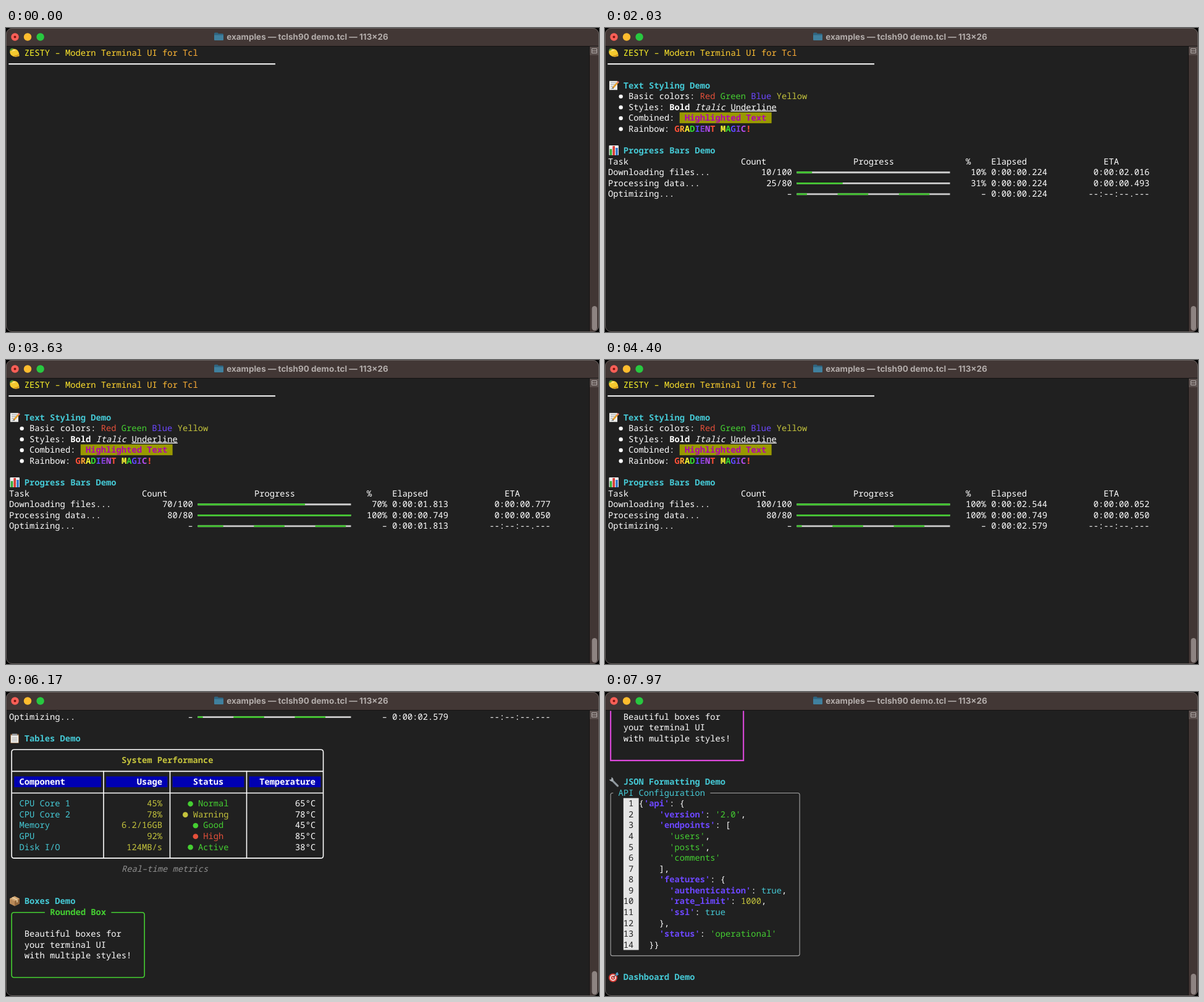
An HTML page that plays this animation: 960x492 px, repeating every 8000 ms.

```html
<!DOCTYPE html>
<html lang="en">
<head>
<meta charset="utf-8">
<title>Terminal demo</title>
<style>
html, body { margin: 0; width: 100%; height: 100%; overflow: hidden; background: #000; }
svg { display: block; width: 960px; height: 492px; }
text {
  font: 500 13.783px "Noto Sans Mono", "DejaVu Sans Mono", monospace;
  white-space: pre; text-rendering: geometricPrecision; font-variant-ligatures: none;
}
.b { font-weight: 700; }
.i { font-style: italic; }
.u { text-decoration: underline; }
.caption { font: 700 13.5px Inter, "Liberation Sans", sans-serif; text-anchor: middle; }
</style>
</head>
<body>
<svg viewBox="0 0 960 492">
  <defs>
    <clipPath id="win"><rect width="960" height="492" rx="10"/></clipPath>
    <clipPath id="view"><rect y="30.5" width="944" height="460"/></clipPath>
  </defs>
  <g clip-path="url(#win)">
    <rect width="960" height="492" fill="#202020"/>
    <rect width="960" height="29" fill="#423735"/>
    <rect x="944" y="29" width="16" height="463" fill="#413634"/>
    <path d="M0 29.5H960M944.5 29V492" stroke="#151313"/>
    <rect x="945" y="30" width="14" height="14" fill="#5a4f4d"/>
    <path d="M948.5 33.5h8v7h-8zM948.5 37h8" fill="none" stroke="#b3acaa"/>
    <rect id="thumb" x="948.5" width="8.5" rx="4.2" fill="#8d8381"/>
    <g clip-path="url(#view)"><g id="doc"></g></g>
  </g>
  <rect x=".5" y=".5" width="959" height="491" rx="9.5" fill="none" stroke="#67605e"/>
  <circle cx="14.5" cy="14.5" r="6.2" fill="#ff5f57"/>
  <circle cx="14.5" cy="14.5" r="2" fill="#7d1510"/>
  <circle cx="35" cy="14.5" r="6.2" fill="#febc2e"/>
  <circle cx="55.6" cy="14.5" r="6.2" fill="#28c840"/>
  <path d="M337 9q0-1.500 1.500-1.500h4l1.500 1.500h6.500q1.500 0 1.500 1.500v8q0 1.500-1.500 1.500h-12q-1.500 0-1.500-1.500z" fill="#2f6580"/>
  <path d="M337 11.500h15v7q0 1.500-1.500 1.500h-12q-1.500 0-1.500-1.500z" fill="#40809e"/>
  <text class="caption" x="488" y="19" fill="#b3adab">examples — tclsh90 demo.tcl — 113×26</text>
</svg>
<script>
const LOOP = 8000, CW = 8.27, LH = 17.56;
const WHITE = '#fff', RED = '#e5503a', GREEN = '#45cf32', BLUE = '#6c47ff',
      YELLOW = '#c4c33c', CYAN = '#45c8d4', GREY = '#8f8f8f', PINK = '#dd48dc';
const X = c => 5 + c * CW, Y = r => 40 + r * LH;

// ---- drawing helpers: rows and columns of the terminal grid ----
const span = (s, fill) => `<tspan fill="${fill}">${s}</tspan>`;
const put = (r, c, s, fill = WHITE, cls = '') =>
  `<text x="${X(c)}" y="${Y(r) + 4.9}" fill="${fill}" class="${cls}">${s}</text>`;
const right = (r, end, s, fill, cls) => put(r, end - s.length, s, fill, cls);
const dot = (r, c, fill, size) => `<circle cx="${X(c + .5)}" cy="${Y(r) + .6}" r="${size}" fill="${fill}"/>`;
const fillCells = (r, c1, c2, fill, rows = 1) =>
  `<rect x="${X(c1)}" y="${Y(r) - 8.8}" width="${(c2 - c1) * CW}" height="${rows * LH}" fill="${fill}"/>`;
const path = (d, color, w, extra = '') => `<path d="${d}" fill="none" stroke="${color}" stroke-width="${w}" ${extra}/>`;
const hLine = (r, x1, x2, color, w, extra) => path(`M${x1} ${Y(r) + .6}H${x2}`, color, w, extra);

// Frame from row r1 to r2, right edge at column c2, top edge open between two columns
function frame(r1, r2, c2, [g1, g2], color, w, rad, inset = 0) {
  const x0 = X(.5) + inset, x1 = X(c2 + .5) - inset, y0 = Y(r1) + .6 + inset, y1 = Y(r2) + .6 - inset;
  return path(`M${X(g1)} ${y0}H${x0 + rad}Q${x0} ${y0} ${x0} ${y0 + rad}V${y1 - rad}Q${x0} ${y1} ${x0 + rad} ${y1}` +
    `H${x1 - rad}Q${x1} ${y1} ${x1} ${y1 - rad}V${y0 + rad}Q${x1} ${y0} ${x1 - rad} ${y0}H${X(g2)}`, color, w);
}

const icons = {
  lemon: `<path d="M-7.500-3Q-5-7.500 1-6Q7-4 7.500 3.500Q8 6 6 6Q-1 8-5.500 4Q-8.500 1-7.500-3z" fill="#f4c92f"/>
    <path d="M-5-2Q-2-6 2-4Q-2-3-5-2z" fill="#fff0a0"/><path d="M-3 4Q2 7 6 5.500Q7 4 6.500 2Q3 5-3 4z" fill="#d99a1c"/>
    <path d="M-8-3Q-7-8-2-7Q-4-3-8-3z" fill="#5f9a35"/>`,
  memo: `<path d="M-7-7H6V7.500H-7z" fill="#eeeeec"/><path d="M-5-4H4M-5-1H4M-5 2H1M-5 5H0" stroke="#9aa0a6"/>
    <path d="M7-5L-1 4" stroke="#e8a02e" stroke-width="2.800"/><path d="M-2 5.500L-1.800 3L0 4.700z" fill="#333"/><path d="M6-4L8-6" stroke="#e77c7c" stroke-width="2.800"/>`,
  chart: `<rect x="-7.500" y="-8" width="15.500" height="16" rx="1" fill="#f1f1f1"/><path d="M-7-3H8M-7 2H8" stroke="#c5ccd2" stroke-width=".7"/>
    <path d="M-4.500 8V-2" stroke="#36ad3b" stroke-width="3.600"/><path d="M.2 8V-7" stroke="#d83a33" stroke-width="3.600"/><path d="M5 8V-4" stroke="#2f74c8" stroke-width="3.600"/>`,
  clipboard: `<rect x="-7" y="-7" width="14" height="15" rx="1.500" fill="#8c6846"/><rect x="-6" y="-5" width="12" height="12" fill="#ecebe7"/>
    <path d="M-4-1H4M-4 1.500H4M-4 4H4" stroke="#b0b0b0"/><path d="M-4-7.500H4V-4.500H-4z" fill="#9b9fa4"/>`,
  parcel: `<path d="M-8-4L0-8L8-4L8 4L0 8L-8 4z" fill="#b98a58"/><path d="M0 0L8-4V4L0 8z" fill="#94683d"/>
    <path d="M-8-4L0-8L8-4L0 0z" fill="#d1a572"/><path d="M-4-6L4-2V2" fill="none" stroke="#ecd2a6" stroke-width="1.600"/>`,
  wrench: `<path d="M-3-3L6.500 6.500" stroke="#8f979d" stroke-width="3.200" stroke-linecap="round"/>
    <path d="M-3.500-7.500Q1-5-1-1Q-4 1-7.500-3.500L-4.500-3.500L-3.500-5z" fill="#a4abb0"/>`,
  target: `<circle cx="-1" cy="1" r="7" fill="#d53c36"/><circle cx="-1" cy="1" r="5" fill="#f3eeee"/><circle cx="-1" cy="1" r="3.300" fill="#d53c36"/>
    <circle cx="-1" cy="1" r="1.300" fill="#fff"/><path d="M-1 1L5-5" stroke="#444" stroke-width="1.200"/><path d="M3-3L4-7L7-8L7-5.500L8.500-5L6-2.500z" fill="#4a9ac4"/>`
};
const icon = (r, name) => `<g transform="translate(14 ${Y(r)})">${icons[name]}</g>`;
const heading = (r, name, s) => icon(r, name) + put(r, 3, s, CYAN, 'b');
const bullet = (r, s) => dot(r, 2, WHITE, 3.2) + put(r, 4, s);

// ---- terminal content ----
function banner() {
  const s = 'ZESTY – Modern Terminal UI for Tcl';
  const letters = [...s].map((ch, i) => {
    const f = i / (s.length - 1);
    return span(ch, `rgb(255,${Math.round(252 - 80 * f)},${Math.round(40 + 15 * f)})`);
  });
  return icon(0, 'lemon') + put(0, 3, letters.join('')) + hLine(1, 4.3, 436, WHITE, 2);
}

function rainbow() {
  const hues = ['#ff5038', '#ffa32e', '#ffff33', '#35d92e', '#5b48ff', '#8040d8', '#b64df2'];
  return bullet(7, 'Rainbow:') +
    put(7, 13, [...'GRADIENT MAGIC!'].map((ch, i) => span(ch, hues[i % 7])).join(''), WHITE, 'b');
}

function table() {
  const cols = [0, 18, 31, 46, 61];
  const rows = [
    ['CPU Core 1', '45%', 'Normal', 35, GREEN, '65°C'],
    ['CPU Core 2', '78%', 'Warning', 34, YELLOW, '78°C'],
    ['Memory', '6.2/16GB', 'Good', 36, GREEN, '45°C'],
    ['GPU', '92%', 'High', 36, RED, '85°C'],
    ['Disk I/O', '124MB/s', 'Active', 35, GREEN, '38°C']
  ];
  let out = frame(16, 26, 61, [1, 1], WHITE, 1.6, 4) + put(17, 22, 'System Performance', YELLOW, 'b');
  for (const r of [18, 20]) out += hLine(r, X(.5), X(61.5), WHITE, 1.6);
  for (const c of cols.slice(1, 4)) out += path(`M${X(c + .5)} ${Y(18)}V${Y(26) + 1}`, WHITE, 1.6);
  for (let i = 0; i < 4; i++) out += fillCells(19, cols[i] + 1, cols[i + 1], '#0000b2');
  out += put(19, 2, 'Component', WHITE, 'b') + put(19, 25, 'Usage', WHITE, 'b') +
    put(19, 36, 'Status', WHITE, 'b') + put(19, 49, 'Temperature', WHITE, 'b');
  rows.forEach(([name, use, state, c, color, temp], i) => {
    const r = 21 + i;
    out += put(r, 2, name, CYAN) + right(r, 30, use, YELLOW) + dot(r, c, color, 4.3) +
      put(r, c + 2, state, color) + right(r, 60, temp);
  });
  return out + put(27, 22, 'Real–time metrics', GREY, 'i');
}

const boxText = r => ['Beautiful boxes for', 'your terminal UI', 'with multiple styles!']
  .map((s, i) => put(r + i, 3, s)).join('');

function json() {
  const lines = [
    [6, "{'api': {"], [10, "'version': '2.0',"], [10, "'endpoints': ["], [12, "'users',"], [12, "'posts',"],
    [12, "'comments'"], [10, '],'], [10, "'features': {"], [12, "'authentication': true,"],
    [12, "'rate_limit': 1000,"], [12, "'ssl': true"], [10, '},'], [10, "'status': 'operational'"], [8, '}}']
  ];
  const paint = s => s.replace(/('\w+')(?=:)|('[^']+')|(true)|(\d+)/g, (m, key, str, bool) =>
    key ? `<tspan class="b" fill="${BLUE}">${m}</tspan>` : span(m, str ? GREEN : bool ? CYAN : YELLOW));
  let out = heading(53, 'wrench', 'JSON Formatting Demo') + frame(54, 69, 37, [1, 20], '#a6a6a6', 1.1, 3) +
    put(54, 2, 'API Configuration', CYAN) + fillCells(55, 3, 6, '#e5e5e5', 14);
  lines.forEach(([c, s], i) => {
    out += right(55 + i, 5, String(i + 1), '#222') + put(55 + i, c, paint(s));
  });
  return out;
}

// ---- progress bars ----
const BAR_START = 1805;
const ticks = [[1, 14], [5, 224], [15, 749], [21, 1081], [49, 2544], [50, 2579]];
function stamp(k) {
  const j = ticks.findIndex(p => p[0] >= k);
  if (j === 0) return ticks[0][1];
  const [a, ta] = ticks[j - 1], [b, tb] = ticks[j];
  return Math.round(ta + (tb - ta) * (k - a) / (b - a));
}
function tickAt(t) {
  let k = 0;
  while (k < 50 && BAR_START + stamp(k + 1) <= t) k++;
  return k;
}
const clock = ms => '0:00:0' + (ms / 1000).toFixed(3);
const track = (r, color, cells, extra) => hLine(r, X(37) - .6, X(37 + cells) - .6, color, 2.8, extra);

function task(r, name, k, step, total) {
  const last = Math.min(k, total / step - 1), seen = last * step, n = Math.min(k * step, total);
  return put(r, 0, name) + right(r, 36, n + '/' + total) + track(r, '#cdcdcd', 30) +
    track(r, '#3fc42d', Math.floor(30 * n / total)) + right(r, 74, Math.floor(100 * n / total) + '%') +
    put(r, 75, clock(stamp(last))) + right(r, 106, clock(stamp(last) * (total - seen) / seen));
}
function bars(k) {
  if (!k) return '';
  const phase = 8 + Math.round(1.311 * (k - 5)), run = 6 * CW;
  const heads = [[0, 'Task'], [26, 'Count'], [48, 'Progress'], [70, '%'], [75, 'Elapsed'], [97, 'ETA']];
  return heads.map(([c, s]) => put(10, c, s)).join('') +
    task(11, 'Downloading files...', k, 2, 100) + task(12, 'Processing data...', k, 5, 80) +
    put(13, 0, 'Optimizing...') + right(13, 36, '–') + track(13, '#cdcdcd', 30) +
    track(13, '#3fc42d', 30, `stroke-dasharray="${run} ${run}" stroke-dashoffset="${-phase * CW}"`) +
    right(13, 74, '–') + put(13, 75, clock(stamp(k))) + right(13, 106, '--:--:--.---');
}

// ---- timeline: [time, rows scrolled, markup] ----
const steps = [
  [0, 0, banner()],
  [500, 0, heading(3, 'memo', 'Text Styling Demo')],
  [800, 0, bullet(4, `Basic colors: ${span('Red', RED)} ${span('Green', GREEN)} ${span('Blue', BLUE)} ${span('Yellow', YELLOW)}`)],
  [900, 0, bullet(5, 'Styles:') + put(5, 12, 'Bold', WHITE, 'b') + put(5, 17, 'Italic', WHITE, 'i') + put(5, 24, 'Underline', WHITE, 'u')],
  [1000, 0, bullet(6, 'Combined:') + fillCells(6, 14, 32, '#999900') + put(6, 15, 'Highlighted Text', '#b200b2', 'b')],
  [1100, 0, rainbow()],
  [1600, 0, heading(9, 'chart', 'Progress Bars Demo')],
  [4930, 0, heading(15, 'clipboard', 'Tables Demo')],
  [5330, 4, table()],
  [5930, 13, heading(30, 'parcel', 'Boxes Demo') + frame(31, 37, 26, [7, 20], GREEN, 1.6, 4) +
    put(31, 8, 'Rounded Box', GREEN, 'b') + boxText(33)],
  [6470, 20, frame(38, 44, 26, [7, 19], BLUE, 1.5, 0, -1.5) + frame(38, 44, 26, [7, 19], BLUE, 1.5, 0, 1.5) +
    put(38, 8, 'Double Box', BLUE, 'b') + boxText(40)],
  [6970, 27, frame(45, 51, 26, [8, 19], PINK, 2.1, 0) + put(45, 9, 'Heavy Box', PINK, 'b') + boxText(47)],
  [7470, 45, json()],
  [7970, 47, heading(71, 'target', 'Dashboard Demo')]
];

const doc = document.getElementById('doc'), thumb = document.getElementById('thumb');
doc.innerHTML = steps.map(s => `<g>${s[2]}</g>`).join('') + '<g></g>';
const groups = [...doc.children], barGroup = groups.pop();
let shown = -1, tick = -1;

function render(t) {
  const n = steps.filter(s => s[0] <= t).length, k = tickAt(t);
  if (n !== shown) {
    shown = n;
    groups.forEach((g, i) => g.setAttribute('visibility', i < n ? 'visible' : 'hidden'));
    const rows = steps[n - 1][1], top = 450 + 6 * rows / 47;
    doc.setAttribute('transform', `translate(0 ${-rows * LH})`);
    thumb.setAttribute('y', top);
    thumb.setAttribute('height', 489.5 - top);
  }
  if (k !== tick) barGroup.innerHTML = bars(tick = k);
}

const start = performance.now();
function play() {
  render((performance.now() - start) % LOOP);
  requestAnimationFrame(play);
}
play();
</script>
</body>
</html>
```
